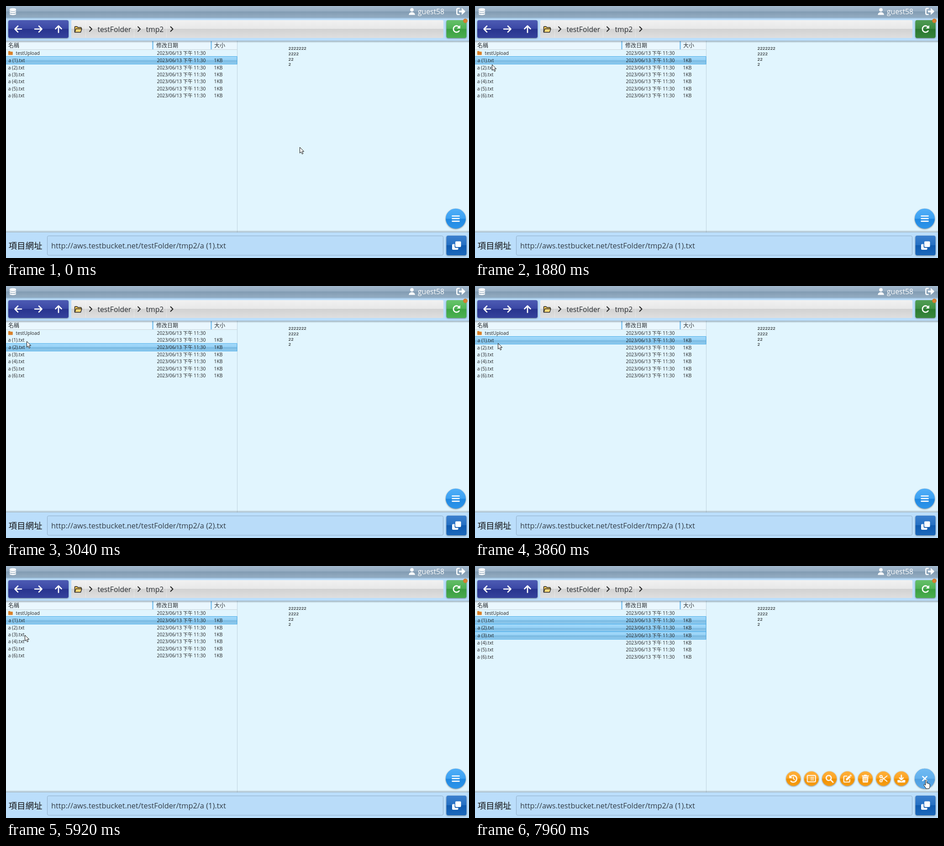
Recreate the animation shown at these times as an HTML page. Size 1014 px wide and 552 px high, loop 8000 ms.

```html
<!DOCTYPE html>
<html lang="zh-Hant">
<head>
<meta charset="utf-8">
<title>File manager</title>
<style>
html, body { margin: 0; width: 100%; height: 100%; overflow: hidden; background: #e1f5fe; }
svg { display: block; width: 1014px; height: 552px; }
text { font-family: "Open Sans", "Noto Sans", "Noto Sans CJK TC", "Noto Sans CJK", sans-serif; fill: #2b2f33; white-space: pre; }
.row { font-size: 10.3px; fill: #222; }
.head { font-size: 12px; fill: #000; }
.crumb { font-size: 15.7px; }
.url { font-size: 16.35px; fill: #333d47; }
.label { font-size: 18.5px; fill: #111; }
.mono { font: 9.4px "Liberation Mono", "DejaVu Sans Mono", monospace; fill: #000; }
.line { fill: none; stroke: #fff; stroke-width: 2.6; stroke-linecap: round; stroke-linejoin: round; }
.thin { stroke-width: 2; }
.white { fill: #fff; }
.drop { filter: drop-shadow(0 1px 1.5px rgba(0, 0, 0, .45)); }

/* every animation shares one 8 s clock */
.a, .b, .c, .glow, #pointer, .arrow, .hand, .closed, .open { animation: 8s linear infinite; }
.a { animation-name: one; animation-timing-function: step-end; }
.b { animation-name: two; animation-timing-function: step-end; }
.c { animation-name: three; animation-timing-function: step-end; }
@keyframes one { 0% { opacity: 1 } 27.5% { opacity: 0 } 39.375% { opacity: 1 } 76.875%, 100% { opacity: 0 } }
@keyframes two { 0% { opacity: 0 } 27.5% { opacity: 1 } 39.375%, 100% { opacity: 0 } }
@keyframes three { 0% { opacity: 0 } 76.875%, 100% { opacity: 1 } }

.glow { animation-name: glow; animation-timing-function: ease-in-out; }
@keyframes glow {
  0%, 100% { opacity: .1 }
  3.44%, 36.44%, 69.44% { opacity: 0 }
  19.94%, 52.94%, 85.94% { opacity: 1 }
}

#pointer { animation-name: move; animation-timing-function: ease-in-out; }
@keyframes move {
  0%, 4% { transform: translate(643px, 309px) }
  11.6%, 24.8% { transform: translate(37px, 128px) }
  27%, 36% { transform: translate(37px, 136px) }
  38.6%, 41.5% { transform: translate(46px, 119px) }
  45.5%, 53.5% { transform: translate(50px, 125px) }
  59%, 62% { transform: translate(39px, 156px) }
  67%, 77.5% { transform: translate(41px, 151px) }
  83.8% { transform: translate(997px, 426px) }
  86.5%, 91.3% { transform: translate(1007px, 465px) }
  94.2%, 100% { transform: translate(988px, 469px) }
}
.arrow { animation-name: arrow; animation-timing-function: step-end; }
.hand { animation-name: hand; animation-timing-function: step-end; }
@keyframes arrow { 0% { opacity: 1 } 85%, 100% { opacity: 0 } }
@keyframes hand { 0% { opacity: 0 } 85%, 100% { opacity: 1 } }

.closed { animation-name: closed; animation-timing-function: step-end; }
.open { animation-name: open; animation-timing-function: step-end; }
@keyframes closed { 0% { opacity: 1 } 95%, 100% { opacity: 0 } }
@keyframes open { 0% { opacity: 0 } 95%, 100% { opacity: 1 } }
.hover { animation: hover 8s linear infinite; }
@keyframes hover { 0%, 92.6% { opacity: 0 } 94%, 100% { opacity: 1 } }
</style>
</head>
<body>
<svg viewBox="0 0 1014 552">
  <defs id="defs"></defs>

  <!-- list and preview -->
  <rect width="1014" height="552" fill="#e1f5fe"/>
  <rect y="76" width="506" height="19" fill="#eaf7fe"/>
  <path d="M0 95.5H506" stroke="#cbd5da"/>
  <path d="M506.5 76V496" stroke="#bfd3de"/>
  <path d="M321.5 77V95M449.5 77V95" stroke="#81c3ee" stroke-width="2.6"/>
  <g class="head">
    <text x="5" y="90.5">名稱</text><text x="329" y="90.5">修改日期</text><text x="456" y="90.5">大小</text>
  </g>
  <g id="lists"></g>
  <g id="preview"></g>

  <!-- toolbar -->
  <rect y="76" width="1014" height="5" fill="url(#shade)"/>
  <rect y="24" width="1014" height="52" fill="#bbdefb"/>
  <rect y="24" width="1014" height="5" fill="url(#shade)"/>
  <rect width="1014" height="24" fill="url(#bar)"/>
  <g class="white">
    <path d="M8 7.2c0-3.2 14-3.2 14 0v2c0 3-14 3-14 0z"/>
    <path d="M8 11c2 2.2 12 2.2 14 0v2.6c0 3-14 3-14 0z"/>
    <path d="M8 15.4c2 2.2 12 2.2 14 0v2.2c0 3.2-14 3.2-14 0z"/>
    <circle cx="889" cy="8.4" r="3.8"/>
    <path d="M882.3 19.5c0-8 13.4-8 13.4 0z"/>
    <text class="crumb white" x="902" y="18">guest58</text>
  </g>
  <path class="line" d="M992.5 5.3h-2.5q-2.6 0-2.6 2.6v8q0 2.6 2.6 2.6h2.5"/>
  <path class="white" d="M992 10h6V5.4q0-1 1-.3l6.5 6q.8.8 0 1.6l-6.500 6q-1 .7-1-.3V14h-6z"/>

  <rect class="drop" x="5" y="31" width="132" height="39" rx="4" fill="url(#indigo)"/>
  <path class="line" d="M34 50.500H19.500M26 44l-6.500 6.500 6.500 6.500M63 50.500H78.500M72 44l6.500 6.500-6.500 6.500M115 58V43.500M108.500 50l6.500-6.500 6.500 6.500"/>
  <rect x="143" y="31" width="815" height="39" rx="2" fill="url(#silver)"/>
  <path d="M174.500 32V69M280.500 32V69M351.500 32V69" stroke="#fff" stroke-opacity=".35"/>
  <path d="M150.500 57.500V46q0-1 1-1h4l2 2h6.500q1 0 1 1v2" fill="#f5c95a" stroke="#222" stroke-width="1.4"/>
  <path d="M150.500 57.500l2.800-7.500h12.700l-2.500 7.500z" fill="#ffd978" stroke="#222" stroke-width="1.4" stroke-linejoin="round"/>
  <path class="line" style="stroke:#222;stroke-width:2" d="M183 45.500l5 5-5 5M289 45.500l5 5-5 5M360.500 45.500l5 5-5 5"/>
  <text class="crumb" x="200.500" y="56.500">testFolder</text>
  <text class="crumb" x="306.500" y="56.500">tmp2</text>

  <rect class="drop" x="964.500" y="31" width="44" height="39" rx="4" fill="url(#green)"/>
  <rect class="glow" x="964.500" y="31" width="44" height="39" rx="4" fill="url(#forest)"/>
  <path class="line" d="M992.500 54.500a7 7 0 1 1 .2-8"/>
  <path class="white" d="M994.800 42v7.300h-7.300z"/>
  <circle cx="1006" cy="32.500" r="4.500" fill="#d9802e" stroke="#c06f2c" stroke-width=".7"/>

  <!-- address bar -->
  <rect y="491" width="1014" height="5" fill="url(#rise)"/>
  <rect y="496" width="1014" height="56" fill="#bbdefb"/>
  <text class="label" x="5.500" y="532">項目網址</text>
  <rect x="90.500" y="503.500" width="867" height="42.500" rx="3" fill="#b9dcf9" stroke="#91aec8"/>
  <text class="url a" x="99" y="530.700">http://aws.testbucket.net/testFolder/tmp2/a (1).txt</text>
  <text class="url b" x="99" y="530.700">http://aws.testbucket.net/testFolder/tmp2/a (2).txt</text>
  <text class="url c" x="99" y="530.700">http://aws.testbucket.net/testFolder/tmp2/a (1).txt</text>
  <rect class="drop" x="964.500" y="503" width="44" height="43" rx="4" fill="url(#blue)"/>
  <rect class="white" x="984" y="515.500" width="12.500" height="12.500" rx="2"/>
  <path class="white" d="M979 521.500h3.500v6q0 2.300 2.300 2.300h5.700v2.200q0 2-2 2h-9.500q-2 0-2-2v-8.500q0-2 2-2z"/>

  <!-- action menu -->
  <g id="menu"></g>
  <circle class="drop" cx="985" cy="465.700" r="22" fill="url(#sky)"/>
  <circle class="hover" cx="985" cy="465.700" r="22" fill="url(#pale)"/>
  <path class="line closed" d="M977.500 460h15M977.500 465.700h15M977.500 471.400h15"/>
  <path class="line open" d="M980.500 461.200l9 9M989.500 461.200l-9 9"/>

  <g id="pointer">
    <path class="arrow" d="M.5.5V13.200l2.900-2.700 2.100 4.800 2.200-1-2.100-4.600h4z" fill="#fff" stroke="#111" stroke-width="1"/>
    <path class="hand" d="M-1.500 1.500q0-1.500 1.400-1.500t1.400 1.500v5q2.200-.7 2.500.8 2.200-.6 2.400 1 2-.2 2 1.600v3.600q0 2-1.500 4v1.300h-7.200v-1.300l-4.300-6q-1-1.500.2-2t2.300 1l.8.8z" fill="#fff" stroke="#111" stroke-width="1"/>
  </g>
</svg>
<script>
const put = (id, html) => document.getElementById(id).innerHTML += html;

// glossy fills: four tones, with a hard break halfway down
const gloss = {
  bar: ['#a3b9cd', '#93abc1', '#819bb2', '#93abc0'],
  indigo: ['#4d5bb3', '#3a47a4', '#28348e', '#35429c'],
  silver: ['#f1f1f1', '#e8e8e8', '#d2d2d2', '#dfdfdf'],
  green: ['#68c56c', '#51b656', '#3ea544', '#4db452'],
  forest: ['#4c9650', '#39853e', '#28732d', '#347f39'],
  blue: ['#3b7fcd', '#236fc3', '#0f5bb0', '#1c68bb'],
  sky: ['#50aef8', '#3ba1f2', '#1f88e2', '#2d95ea'],
  pale: ['#70baf2', '#62b1ee', '#509fe0', '#5aaae9'],
  orange: ['#ffb03a', '#fca421', '#f09100', '#f89d12'],
  pick: ['#a8dcfb', '#92cff5', '#78b8e0', '#94cdf0']
};
const stop = (at, color, alpha = 1) =>
  `<stop offset="${at}" stop-color="${color}" stop-opacity="${alpha}"/>`;
const gradient = (id, stops) =>
  `<linearGradient id="${id}" x2="0" y2="1">${stops}</linearGradient>`;

put('defs', Object.entries(gloss).map(([id, tones]) =>
  gradient(id, tones.map((c, i) => stop([0, .5, .5, 1][i], c)).join(''))).join('') +
  gradient('shade', stop(0, '#345', .4) + stop(1, '#345', 0)) +
  gradient('rise', stop(0, '#345', 0) + stop(1, '#345', .35)));

// one file list per selection state; selected rows are slightly taller
function fileList(state, picked) {
  let y = 95.3, out = '';
  for (let i = 0; i < 7; i++) {
    const on = picked.includes(i), h = on ? 16.7 : 15.3;
    const base = y + h / 2 + 3.7;
    if (on) out += `<rect x="-.5" y="${y}" width="506.500" height="${h}" fill="url(#pick)" stroke="#45aae9"/>`;
    if (!i) out += '<path d="M5 99.500q0-.8.8-.8h3l1.200 1.300h4q.8 0 .8.800v5.600q0 .8-.8.800h-8.200q-.8 0-.8-.8z" fill="#d9822b"/>';
    out += `<text x="${i ? on ? 5.5 : 4.7 : 21.5}" y="${base}">${i ? `a (${i}).txt` : 'testUpload'}</text>` +
      `<text x="330.500" y="${base}">2023/06/13 下午 11:30</text>`;
    if (i) out += `<text x="455.500" y="${base}">1KB</text>`;
    y += h;
  }
  return `<g class="${state}">${out.replaceAll('<text', '<text class="row"')}</g>`;
}
put('lists', fileList('a', [1]) + fileList('b', [2]) + fileList('c', [1, 2, 3]));

put('preview', [7, 4, 2, 1].map((n, i) =>
  `<text class="mono" x="618.500" y="${96.2 + i * 11.75}">${'2'.repeat(n)}</text>`).join(''));

// icons around their centre, nearest to the main button first
const icons = [
  '<path class="line" d="M0-7.500V2M-4-1.500L0 2.500 4-1.500"/><path class="white" d="M-8.500 3h4.500l4 3 4-3h4.500v4q0 1.500-1.500 1.500h-14q-1.500 0-1.500-1.500z"/>',
  '<g class="line thin"><circle cx="-5" cy="-4.500" r="2.600"/><circle cx="-5" cy="4.500" r="2.600"/><path d="M-3-3L8 6M-3 3L8-6"/></g>',
  '<path class="white" d="M-7.500-7h4l1-1.500h5l1 1.500h4v2.200h-15z"/><path class="white" d="M-6.500-3.800h13l-.7 11q-.1 1.300-1.500 1.300h-8.600q-1.400 0-1.500-1.300z"/><path d="M-3-1.500v7.500M0-1.500v7.500M3-1.500v7.500" stroke="#f39a10" stroke-width="1.200"/>',
  '<path class="line thin" d="M-1-5.500h-5q-1.800 0-1.800 1.800v9.500q0 1.800 1.800 1.800h9.500q1.800 0 1.800-1.800V2"/><path class="white" d="M-3.500 4l.7-3.800 7-7 3.200 3.200-7 7z"/><path class="white" d="M5-7.500l1-1q.8-.6 1.600.1l1.300 1.300q.7.800 0 1.600l-.8.900z"/>',
  '<circle class="line" cx="-1.500" cy="-1.500" r="5.500"/><path class="line" d="M3 3l5 5"/>',
  '<rect class="line thin" x="-9" y="-7" width="18" height="14" rx="2"/><path class="line thin" stroke-dasharray=".1 3.500 20" d="M-5.500-3h11M-5.500 0h11M-5.500 3h11" style="stroke-width:1.600"/>',
  '<path class="line" d="M-6-4.500a7.500 7.500 0 1 1 .5 10"/><path class="white" d="M-9-8v7h7z"/><path class="line thin" d="M0-3.500V.5l3 2"/>'
];

// each button fades, grows and slides out of the main one in turn
const pct = ms => (ms / 80).toFixed(2) + '%';
let css = '';
put('menu', icons.map((icon, i) => {
  const x = 933.7 - i * 39.4, start = 7590 + i * 25;
  css += `@keyframes pop${i} {
    0%, ${pct(start)} { opacity: 0; transform: translate(${x + 40}px, 465.700px) scale(.4); animation-timing-function: ease-in-out }
    ${pct(start + 180)}, 100% { opacity: 1; transform: translate(${x}px, 465.700px) }
  }`;
  return `<g style="animation: pop${i} 8s infinite"><circle class="drop" r="16" fill="url(#orange)"/>${icon}</g>`;
}).join(''));
document.head.appendChild(document.createElement('style')).textContent = css;
</script>
</body>
</html>
```
